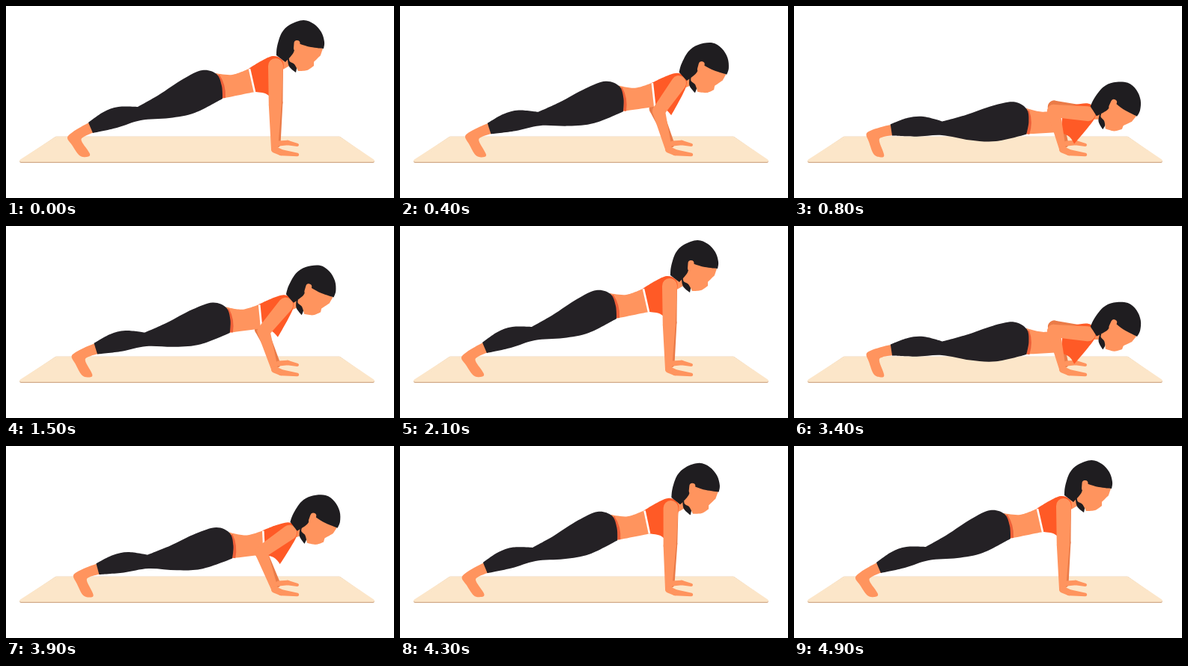
Animation, 518 px wide and 257 px high, one loop 5000 ms. Source, as an HTML page with a canvas:

```html
<!DOCTYPE html>
<html lang="en">
<head>
<meta charset="utf-8">
<title>Push-ups</title>
<style>
html, body { margin: 0; width: 100%; height: 100%; overflow: hidden; background: #fff; }
canvas { display: block; }
</style>
</head>
<body>
<canvas id="stage" width="518" height="257"></canvas>
<script>
const ctx = document.getElementById('stage').getContext('2d');
const SKIN = '#ff945e', SHADE = '#ea7b48', TOP = '#ff5a26', BAND = '#ee5f38';
const CLOTH = '#242125', HAIR = '#1f1d20', MAT = '#fce6c9', MAT_EDGE = '#d2ab8a';
const UPPER_ARM = 46, FOREARM = 52;

// Outlines of the rigid parts with the arms straight.
const foot = [[113,155],[98,163],[86,171],[82,177],[88,186],[98,200],[107,202],[112,198],[101,181],[104,175],[118,169]];
const pants = [[110,156],[130,142],[150,135],[176,135],[204,119],[236,98],[262,86],[281,91],
  [288,107],[289,124],[252,143],[218,150],[180,153],[148,163],[116,170]];
const bra = [[324,84],[340,74],[356,67],[367,71],[370,85],[355,124],[346,117],[332,115]];
const hair = [[397,19],[411,24],[421,35],[425,48],[424,57],[407,55],[393,51],[387,47],[384,62],[373,75],[361,66],[362,54],[368,36],[379,25]];
const face = [[384,54],[395,49],[423,57],[420,66],[411,75],[411,80],[402,86],[390,87],[385,78],[378,72]];
const lock = [[376,70],[378,81],[387,89],[388,80],[384,71]];

// A rigid part slides by `shift` and turns about `pivot`.
function joint([px, py], [dx, dy], degrees) {
  const a = degrees * Math.PI / 180, c = Math.cos(a), s = Math.sin(a);
  return ([x, y, ...rest]) => [
    px + dx + (x - px) * c - (y - py) * s,
    py + dy + (x - px) * s + (y - py) * c,
    ...rest
  ];
}

// Closed smooth outline; the listed points stay sharp.
function shape(points, color, corners = []) {
  const n = points.length;
  const at = i => points[(i + n) % n];
  const handle = (i, sign) => corners.includes(i % n)
    ? at(i)
    : at(i).map((v, k) => v + sign * (at(i + 1)[k] - at(i - 1)[k]) / 6);
  ctx.beginPath();
  ctx.moveTo(...points[0]);
  for (let i = 0; i < n; i++) {
    ctx.bezierCurveTo(...handle(i, 1), ...handle(i + 1, -1), ...at(i + 1));
  }
  ctx.fillStyle = color;
  ctx.fill();
}

// Chain of tapered capsules through [x, y, radius] nodes.
function limb(nodes, color) {
  ctx.fillStyle = color;
  for (let i = 1; i < nodes.length; i++) {
    const [ax, ay, ar] = nodes[i - 1], [bx, by, br] = nodes[i];
    const along = Math.atan2(by - ay, bx - ax);
    const side = Math.acos((ar - br) / Math.hypot(bx - ax, by - ay));
    ctx.beginPath();
    ctx.arc(ax, ay, ar, along + side, along - side);
    ctx.arc(bx, by, br, along - side, along + side);
    ctx.fill();
  }
}

function line([a, b, c = b], color, width) {
  ctx.beginPath();
  ctx.moveTo(...a);
  ctx.quadraticCurveTo(...b, ...c);
  ctx.strokeStyle = color;
  ctx.lineWidth = width;
  ctx.stroke();
}

// Two bones between shoulder and wrist, bending backwards.
function elbowOf([sx, sy], [wx, wy]) {
  const dx = wx - sx, dy = wy - sy, d = Math.hypot(dx, dy);
  const stretch = Math.max(1, d / (UPPER_ARM + FOREARM));
  const upper = UPPER_ARM * stretch, fore = FOREARM * stretch;
  const along = (upper ** 2 - fore ** 2 + d ** 2) / (2 * d);
  const out = Math.sqrt(Math.max(0, upper ** 2 - along ** 2));
  return [sx + (dx * along - dy * out) / d, sy + (dy * along + dx * out) / d];
}

function drawArm(shoulder, wrist, color) {
  limb([[...shoulder, 10], [...elbowOf(shoulder, wrist), 8.5], [...wrist, 4.5]], color);
}

function drawMat() {
  for (const [drop, color] of [[1.3, MAT_EDGE], [0, MAT]]) {
    ctx.beginPath();
    ctx.moveTo(67, 176.5);
    ctx.lineTo(445, 176.5);
    ctx.lineTo(490, 207 + drop);
    ctx.lineTo(20, 207 + drop);
    ctx.closePath();
    ctx.lineJoin = 'round';
    ctx.lineWidth = 3.5;
    ctx.fillStyle = ctx.strokeStyle = color;
    ctx.fill();
    ctx.stroke();
  }
}

function drawBody(p) {
  const legs = joint([113, 163], [17 * p, 3 * p], 14.4 * p);
  const chest = joint([324, 84], [33 * p, 53 * p], 18 * p);
  const head = joint([393, 54], [37 * p, 80.5 * p], 20 * Math.sin(p * Math.PI / 2));
  const shoulder = chest([360, 80]);

  shape(foot.map(legs), SKIN, [0, 10]);
  drawArm(shoulder, [362, 185], SHADE);
  limb([[364, 184, 3.5], [376, 183, 3.2], [389, 186, 2]], SKIN);

  const back = legs([280, 90]), chestTop = chest([324, 84]);
  const sag = [(back[0] + chestTop[0]) / 2, (back[1] + chestTop[1]) / 2 + 5];
  shape([back, sag, chestTop, chest([332, 115]), legs([288, 124])], SKIN, [0, 2, 3, 4]);
  line([[283, 93], [292, 106], [291, 123]].map(legs), BAND, 4);
  shape(pants.map(legs), CLOTH, [0, 3, 9, 14]);

  limb([chest([368, 78, 7]), head([385, 68, 7])], SKIN);
  shape(bra.map(chest), TOP, [0, 5, 7]);
  line([[325, 84], [332, 115]].map(chest), '#fff', 2.6);
  drawArm(shoulder, [358.5, 191], SKIN);
  limb([[358.5, 192, 4.5], [367, 196, 4.2], [389, 199, 2.2]], SKIN);

  shape(lock.map(head), HAIR, [0, 2, 4]);
  shape(face.map(head), SKIN, [2, 3, 4, 5, 7]);
  shape(hair.map(head), HAIR, [4, 9, 10]);
  limb([[388.5, 50, 4], [387, 57, 3]].map(head), SKIN);
}

// 0 is arms straight, 1 is chest at the floor.
function depth(ms) {
  const ease = (start, length) => {
    const k = Math.min(1, Math.max(0, (ms - start) / length));
    return (1 - Math.cos(Math.PI * k)) / 2;
  };
  return ease(105, 720) - ease(930, 1010);
}

const STEP = 100, REP = 2500, start = performance.now();
function frame() {
  const elapsed = Math.max(0, performance.now() - start);
  const ms = Math.floor(elapsed / STEP) * STEP % REP;
  ctx.fillStyle = '#fff';
  ctx.fillRect(0, 0, 518, 257);
  drawMat();
  drawBody(depth(ms));
  requestAnimationFrame(frame);
}
frame();
</script>
</body>
</html>
```
